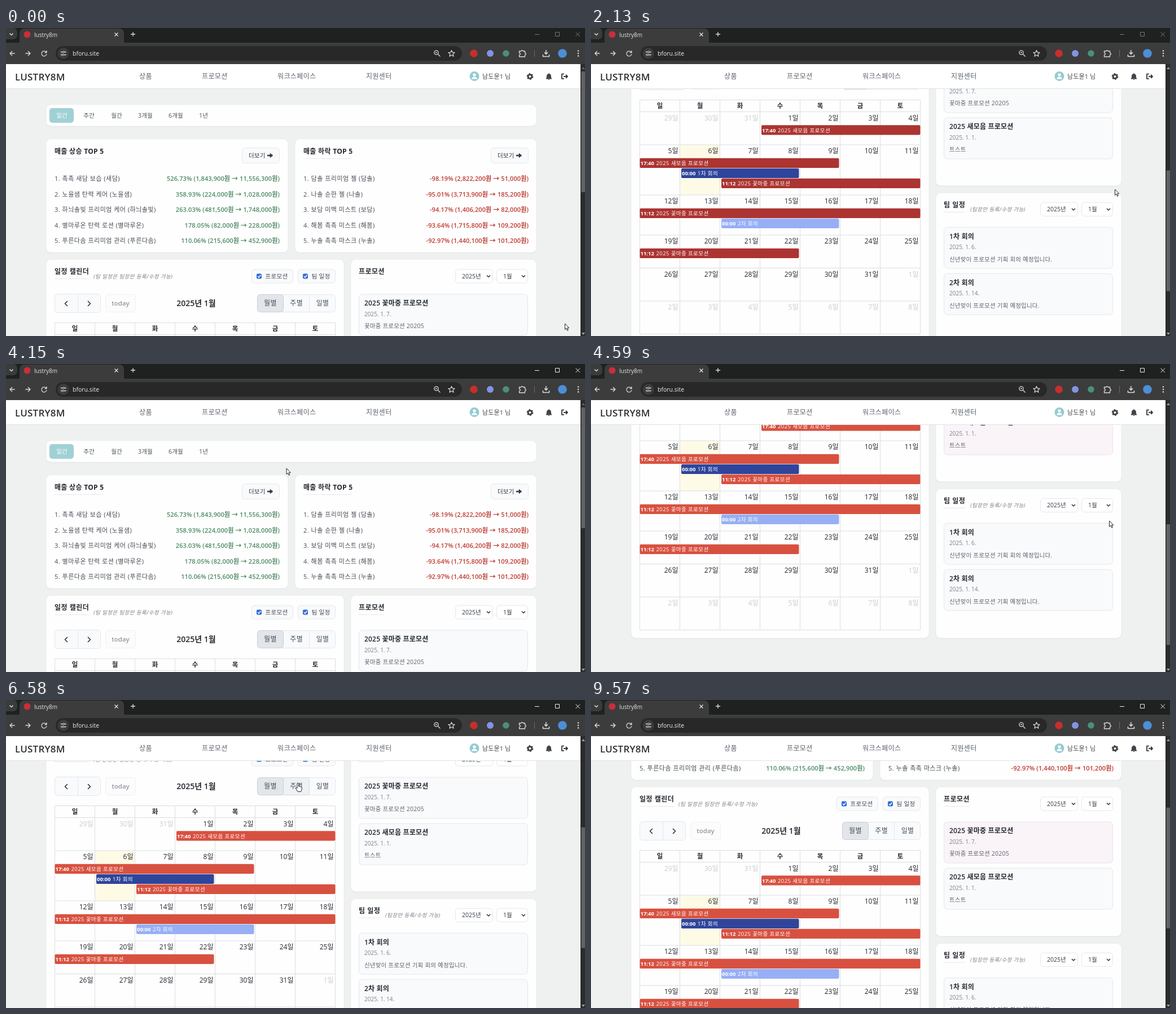
These frames come from a looping animation (1026x546 px, 9.85 s). An HTML page:

```html
<!DOCTYPE html>
<html lang="ko">
<head>
<meta charset="utf-8">
<title>lustry8m</title>
<style>
html, body { margin: 0; width: 100%; height: 100%; overflow: hidden; background: #eff1f1; }
svg { display: block; width: 1026px; height: 546px; }
text { font-family: "Open Sans", "Noto Sans CJK KR", "Noto Sans CJK JP", sans-serif; white-space: pre; }
.b { font-weight: 700; }
.s { font-weight: 600; }
.m { text-anchor: middle; }
.e { text-anchor: end; }
.i { font-style: italic; }
</style>
</head>
<body>
<svg viewBox="0 0 1026 546">
  <g id="page"></g>
  <g id="chrome"></g>
  <g id="pointer"></g>
</svg>
<script>
const LOOP = 9850, STEP = 1000 / 7;
const INK = '#23272e', GREY = '#5b626b', SOFT = '#7b8189', LINE = '#e4e7eb', PALE = '#f9fafc';

// Drawing helpers: rectangle, circle, path and vertically centred text
const rect = (x, y, w, h, r, fill, stroke = 'none') =>
  `<rect x="${x}" y="${y}" width="${w}" height="${h}" rx="${r}" fill="${fill}" stroke="${stroke}"/>`;
const circle = (x, y, r, fill, more = '') => `<circle cx="${x}" cy="${y}" r="${r}" fill="${fill}" ${more}/>`;
const path = (d, stroke, width = 1.3, fill = 'none') =>
  `<path d="${d}" fill="${fill}" stroke="${stroke}" stroke-width="${width}" stroke-linejoin="round"/>`;
const text = (x, y, str, size, fill, cls = '', gap = 0.2) =>
  `<text x="${x}" y="${y + size * 0.37}" font-size="${size}" fill="${fill}" class="${cls}" letter-spacing="${gap}">${str}</text>`;
const card = (x, y, w, h) =>
  rect(x - 0.5, y, w + 1, h + 1.2, 8.5, '#e5e8e8') + rect(x + 0.3, y + 0.3, w - 0.6, h - 0.6, 8, '#fefefe');
const chevron = (x, y, color = '#333') => path(`M${x - 3} ${y - 1.5}l3 3 3-3`, color, 1.5);
const heading = (x, y, str, width, gap = 0.5) =>
  text(x, y, str, 12, INK, 'b', gap) + path(`M${x} ${y + 12.5}h${width}`, LINE, 1);

// Linear interpolation through rows of [step, ...values]
function track(keys, k) {
  const n = keys.findIndex(row => row[0] > k);
  if (n < 0) return keys[keys.length - 1].slice(1);
  if (n === 0) return keys[0].slice(1);
  const a = keys[n - 1], b = keys[n], u = (k - a[0]) / (b[0] - a[0]);
  return a.slice(1).map((v, i) => v + (b[i + 1] - v) * u);
}

const within = (k, from, to) => k >= from && k < to;
const isAway = k => within(k, 21, 29);

const scrollKeys = [
  [8, 0], [12, 340], [14, 395], [20, 395], [21, 313], [28, 313],
  [29, 0], [30, 130], [31, 300], [32, 466], [38, 466], [43, 335], [47, 335], [51, 256]
];
const pointerKeys = [
  [0, 990, 524], [1, 997, 440], [2, 990, 340], [3, 969, 263], [5, 969, 263], [8, 930, 290], [15, 928, 286],
  [19, 808, 206], [23, 808, 206], [26, 34, 88], [28, 75, 92], [30, 918, 278], [37, 918, 278],
  [43, 540, 160], [46, 517, 147], [48, 517, 147], [51, 478, 184], [59, 478, 184], [61, 550, 184],
  [65, 550, 184], [67, 1030, 300]
];
const scrollAt = k => track(scrollKeys, k)[0];

const rising = [
  ['촉촉 새담 보습 (새담)', '526.73% (1,843,900원 → 11,556,300원)'],
  ['노을샘 탄력 케어 (노을샘)', '358.93% (224,000원 → 1,028,000원)'],
  ['하늬솔빛 프리미엄 케어 (하늬솔빛)', '263.03% (481,500원 → 1,748,000원)'],
  ['별마루온 탄력 로션 (별마루온)', '178.05% (82,000원 → 228,000원)'],
  ['푸른다솜 프리미엄 관리 (푸른다솜)', '110.06% (215,600원 → 452,900원)']
];
const falling = [
  ['담솔 프리미엄 젤 (담솔)', '-98.19% (2,822,200원 → 51,000원)'],
  ['나솔 순한 젤 (나솔)', '-95.01% (3,713,900원 → 185,200원)'],
  ['보담 미백 미스트 (보담)', '-94.17% (1,406,200원 → 82,000원)'],
  ['해봄 촉촉 미스트 (해봄)', '-93.64% (1,715,800원 → 109,200원)'],
  ['누솔 촉촉 마스크 (누솔)', '-92.97% (1,440,100원 → 101,200원)']
];
// first and last are day cells counted from the top left of the calendar
const events = [
  { time: '17:40', name: '2025 새모음 프로모션', first: 3, last: 11, promo: true },
  { time: '00:00', name: '1차 회의', first: 8, last: 10, color: '#2f459b' },
  { time: '11:12', name: '2025 꽃마중 프로모션', first: 9, last: 24, promo: true },
  { time: '00:00', name: '2차 회의', first: 16, last: 18, color: '#96aff5' }
];
const goods = [
  ['클렌징크림 하늬솔빛 주름|개선', 17600, 10, '15,840'],
  ['프리미엄선케어 하늬솔빛|활력', 72100, 20, '57,680'],
  ['립오일 하늬솔빛 탄력', 74900, 30, '52,430'],
  ['오메가3 하늬솔빛 영양', 49700, 40, '29,820'],
  ['하늬솔빛 깨끗한 관리', 40000, 50, '20,000'],
  ['하늬솔빛 깔끔한 솔루션', 57000, 60, '22,800'],
  ['촉촉 새담 보습', 32500, 20, '26,000']
];

function ranking(x, title, rows, color) {
  const right = x + 414;
  return card(x, 197, x < 100 ? 429 : 428, 201) + heading(x + 15, 219, title, 86, 0.3) +
    rect(right - 66.5, 212.5, 66, 27, 5, PALE, LINE) + text(right - 55, 226, '더보기', 10.5, '#333a44') +
    path(`M${right - 22} 226h6`, '#333a44', 2.6) + path(`M${right - 17} 222l5 4-5 4z`, '#333a44', 0.5, '#333a44') +
    rows.map(([name, value], i) => {
      const y = 267 + 27.6 * i;
      return text(x + 15, y, `${i + 1}. ${name}`, 11, '#454b54', '', 0.5) +
        text(right, y, value, 11, color, 'e s', 0.1);
    }).join('');
}

function toggle(x, w, label, on, hover) {
  return rect(x + 0.5, 428, w - 1, 24, 5, hover ? '#fff' : PALE, hover ? '#7c97dd' : LINE) +
    rect(x + 9, 435.5, 9, 9, 2, on ? '#2f6bd8' : '#fff', on ? 'none' : '#777') +
    (on ? path(`M${x + 11} 440l2 2.2 3.5-4.4`, '#fff', 1.4) : '') +
    text(x + 24.5, 440, label, 10.5, '#454b54', '', 0.3);
}

// Stacks the visible events of each week into lanes; busy weeks grow taller
function planWeeks(k) {
  const promoOn = !within(k, 56, 60), teamOn = !within(k, 62, 65);
  const shown = events.filter(e => e.promo ? promoOn : teamOn);
  let bottom = 543.5;
  const weeks = [0, 7, 14, 21, 28, 35].map(start => {
    const ends = [], bars = [], top = bottom;
    for (const e of shown) {
      const from = Math.max(e.first - start, 0), to = Math.min(e.last - start, 6);
      if (from > 6 || to < 0) continue;
      let lane = ends.findIndex(end => end < from);
      if (lane < 0) lane = ends.length;
      ends[lane] = to;
      bars.push({ e, from, to, lane });
    }
    bottom += Math.max(58.5, 35 + 18 * ends.length);
    return { start, top, height: bottom - top, bars };
  });
  return { promoOn, teamOn, weeks, bottom };
}

function calendar(k, { promoOn, teamOn, weeks, bottom }) {
  const red = k < 21 ? '#ac3431' : '#d85140';
  let out = card(71, 410.5, 528, bottom + 14.5 - 410.5) + heading(86, 432, '일정 캘린더', 61) +
    text(155, 440, '(팀 일정은 팀장만 등록/수정 가능)', 9.5, SOFT, 'i', 0.4) +
    toggle(435, 74, '프로모션', promoOn, within(k, 51, 60)) +
    toggle(517, 67, '팀 일정', teamOn, within(k, 61, 66)) +
    rect(86.5, 471.5, 81, 33, 5, PALE, LINE) + path('M127.5 472v32', LINE, 1) +
    path('M109 484l-4.5 4.5 4.5 4.5M145 484l4.5 4.5-4.5 4.5', '#333', 1.6) +
    rect(176.5, 472.5, 53, 31, 5, '#fcfcfd', '#eef0f2') + text(203, 488, 'today', 11.5, '#92979e', 'm s', 0) +
    text(337, 488, '2025년 1월', 14, INK, 'm s', 0) +
    rect(445.5, 472.5, 138, 31, 5, PALE, LINE) +
    (within(k, 45, 49) ? rect(491.5, 472.5, 46, 31, 4, '#eef1f5', '#d5dae1') : path('M537.5 473v31', LINE, 1)) +
    rect(445.5, 472.5, 46, 31, 5, '#e2e6eb', '#c9cfd7') +
    ['월별', '주별', '일별'].map((s, i) => text(468.5 + 46.3 * i, 487.5, s, 12, '#4a5159', 'm', 0.4)).join('');

  let lines = 'M86.5 522.5h497M86.5 543.5h497', strips = '';
  for (const { start, top, height, bars } of weeks) {
    if (start === 7) out += rect(157.5, top, 71, height, 0, '#fdfae6');
    for (let col = 0; col < 7; col++) {
      const n = start + col - 2, other = n < 1 || n > 31;
      const day = n < 1 ? n + 31 : n > 31 ? n - 31 : n;
      out += text(154.5 + col * 71, top + 10.7, day + '일', 12, other ? '#cacccd' : INK, 'e', 0);
    }
    for (const { e, from, to, lane } of bars) {
      const x = 86.5 + from * 71 + (e.first >= start ? 2.5 : 0);
      const end = 86.5 + (to + 1) * 71 - (e.last < start + 7 ? 2 : 0);
      const y = top + 23.7 + 18 * lane;
      strips += rect(x, y, end - x, 17.3, 2, e.promo ? red : e.color) +
        text(x + 1, y + 8.8, e.time, 9.5, '#fff', 'b', 0) + text(x + 29, y + 8.8, e.name, 9.5, '#fff', '', 0.4);
    }
    lines += `M86.5 ${top + height}h497`;
  }
  for (let col = 0; col < 8; col++) lines += `M${86.5 + col * 71} 522.5V${bottom}`;
  [...'일월화수목금토'].forEach((s, i) => out += text(122 + 71 * i, 532.5, s, 11.5, INK, 'm b', 0));
  return out + path(lines, '#dcdee1', 1) + strips;
}

function isOver(k, top) {
  const [x, y] = track(pointerKeys, k), pageY = y + scrollAt(k);
  return !isAway(k) && within(x, 625, 925) && y > 107 && within(pageY, top, top + 74);
}

// The hover tint lingers for one step
function item(k, top, title, date, note) {
  const fill = isOver(k, top) || isOver(k - 1, top) ? '#faf3f8' : PALE;
  return rect(625.5, top + 0.5, 299, 73, 6, fill, LINE) + text(635, top + 16.5, title, 12, INK, 's', 0.2) +
    text(635, top + 36, date, 10, SOFT, '', 0) + text(635, top + 57, note, 10.5, GREY, '', 0.2);
}

const selects = y =>
  rect(796.5, y - 12, 66, 24, 5, '#fff', LINE) + text(808, y, '2025년', 10.5, '#333a44', '', 0) + chevron(855, y) +
  rect(869.5, y - 12, 55, 24, 5, '#fff', LINE) + text(881, y, '1월', 10.5, '#333a44', '', 0) + chevron(917, y);

function home(k, plan) {
  const side = (plan.bottom + 14.5 - 410.5 - 13) / 2;  // the two side cards share the calendar's height
  const team = 410.5 + side + 13;
  return card(71, 136, 869, 38) + rect(77, 142, 43, 26, 5, '#a0d0d6') +
    [[99, '일간'], [147, '주간'], [196, '월간'], [247, '3개월'], [301, '6개월'], [350, '1년']]
      .map(([x, s], i) => text(x, 155, s, 10.5, i ? '#4a5159' : '#fff', 'm')).join('') +
    ranking(71, '매출 상승 TOP 5', rising, '#4b8a64') + ranking(512, '매출 하락 TOP 5', falling, '#bf372d') +
    calendar(k, plan) +
    card(611, 410.5, 329, side) + heading(625, 432, '프로모션', 46) + selects(440) +
    item(k, 471.5, '2025 꽃마중 프로모션', '2025. 1. 7.', '꽃마중 프로모션 20205') +
    item(k, 553.5, '2025 새모음 프로모션', '2025. 1. 1.', '트스트') +
    card(611, team, 329, side) + heading(625, team + 21, '팀 일정', 38) +
    text(672, team + 28.7, '(팀장만 등록/수정 가능)', 9.5, SOFT, 'i', 0.4) + selects(team + 28.7) +
    item(k, team + 60, '1차 회의', '2025. 1. 6.', '신년맞이 프로모션 기획 회의 예정입니다.') +
    item(k, team + 142, '2차 회의', '2025. 1. 14.', '신년맞이 프로모션 기획 예정입니다.');
}

function detail() {
  return rect(54, 60, 903, 457, 0, '#f8faf9') + card(78, 60, 856, 441) + rect(96, 60, 820, 83, 0, '#f8faf9') +
    text(96, 180, '할인 상품 목록', 14, INK, 'b', 0.7) +
    rect(871, 166, 45, 28, 3, '#6bac5f') + text(893.5, 180, '수정', 12, '#fff', 'm') +
    goods.map(([name, price, off, sale], i) => {
      const x = 96 + 165.75 * (i % 5), top = i < 5 ? 206 : 345, lines = name.split('|');
      const y = top + 15 * (lines.length - 1);
      return rect(x + 0.5, top + 0.5, 156, i < 5 ? 130 : 115, 6, '#fff', LINE) +
        lines.map((s, n) => text(x + 14.5, top + 19.7 + 15.5 * n, s, 11, '#333a44', '', 0.7)).join('') +
        path(`M${x + 12} ${y + 33.5}h132`, LINE, 1) +
        text(x + 14.5, y + 51, price + '원', 10, '#9a9fa5', '', 0) + path(`M${x + 14.5} ${y + 52}h37`, '#9a9fa5', 1) +
        text(x + 14.5, y + 72, off + '% 할인', 10, '#cf5a52') +
        text(x + 14.5, y + 94, sale + '원', 11, INK, 's', 0);
    }).join('');
}

function scrollbar(scroll, pageHeight) {
  const ratio = 461 / pageHeight;
  return rect(1018, 64, 8, 482, 0, '#2b2b2c') + rect(1019.5, 77 + scroll * ratio, 6.5, 482 * ratio, 1, '#626264') +
    path('M1020 73h6l-3-4z', 'none', 0, scroll ? '#a0a0a0' : '#606060') +
    path('M1020 540h6l-3 4z', 'none', 0, '#a0a0a0');
}

function chrome(k) {
  const light = '#dcdcdc', dark = '#3f444b', control = k < 21 ? '#777' : '#eee';
  return rect(0, 0, 1026, 30, 0, '#1f2121') + rect(-6, 0, 26, 20, 7, '#3a3b3b') + chevron(9.5, 11, light) +
    rect(24, 1, 185, 34, 8, '#3c3c3c') + rect(0, 26, 1026, 38, 0, '#3c3c3c') +
    circle(37.5, 11.5, 6, '#c5303c') + text(50, 12, 'lustry8m', 10, '#e6e6e6', '', 0) +
    path('M192.5 8.5l6 6m0-6l-6 6M221 11h8m-4-4v8', light) +
    path('M937 11.5h8M973.5 7.5h7v7h-7zM1009.5 7.5l7.5 7.5m0-7.5l-7.5 7.5', control, 1) +
    path('M15.5 45H7m4-4l-4 4 4 4M34.5 45h8.5m-4-4l4 4-4 4', light) +
    path('M71 42.5A4.5 4.5 0 1 0 72 46M72 40v3.5h-3.5', light) +
    rect(88, 32, 720, 26, 13, '#282828') + circle(101.5, 45, 10, '#3c3c3c') +
    path('M97 42.5h3.5M104 42.5h2.5M97 47.5h2M102.5 47.5h4', light) +
    circle(102.3, 42.5, 1.5, 'none', `stroke="${light}"`) + circle(100.7, 47.5, 1.5, 'none', `stroke="${light}"`) +
    text(118, 45, 'bforu.site' + (isAway(k) ? '<tspan fill="#c8c8c8">/promotion/19</tspan>' : ''), 10.5, '#eee', '', 0) +
    circle(762.5, 43.5, 3.7, 'none', `stroke="${light}" stroke-width="1.3"`) + path('M765.5 46.5l4 4M761 43.5h3', light) +
    path('M789.5 39.5l1.6 3.7 4 .4-3 2.6.9 4-3.5-2.1-3.5 2.1.9-4-3-2.6 4-.4z', light, 1.2) +
    circle(829, 45, 6.8, '#c62f2c') + circle(858, 45, 6, '#8195e3') + circle(886, 45, 5.8, '#4a9077') +
    path('M909.5 41h3.5a1.8 1.8 0 0 1 3.5 0h3v3.2a1.8 1.8 0 0 1 0 3.6V51h-10v-3.2a1.8 1.8 0 0 0 0-3.6z', light) +
    path('M936.5 39v12', '#6a6a6a', 1) + path('M957 39v7m-3-3l3 3.5 3-3.5M951.5 47v3.5h11V47', light, 1.5) +
    circle(986, 45, 7.8, '#4b8fd6') + [40.5, 45, 49.5].map(y => circle(1014, y, 1.3, light)).join('') +
    rect(0, 106, 1018, 2, 0, '#e0e3e3') + rect(0, 64, 1018, 43, 0, '#fff') +
    text(16, 86.5, 'LUSTRY8M', 17, '#2c2f33', 's', 0.2) +
    [[236, '상품'], [347, '프로모션'], [481, '워크스페이스'], [638, '지원센터']]
      .map(([x, s]) => text(x, 85.5, s, 12, GREY, '', 0.35)).join('') +
    circle(830, 85.5, 8.5, '#94cbd2') + circle(830, 83, 2.7, '#fff') + path('M825 90.5a5 4 0 0 1 10 0z', 'none', 0, '#fff') +
    text(844, 86, '남도윤1 님', 11, '#444a52', '', 0.1) +
    circle(928.5, 86, 3.4, 'none', `stroke="${dark}" stroke-width="2.8"`) +
    circle(928.5, 86, 5, 'none', `stroke="${dark}" stroke-width="1.8" stroke-dasharray="2.618"`) +
    path('M957 90c1.5-1.5 1.5-3 1.5-5a3.5 3.5 0 0 1 7 0c0 2 0 3.5 1.5 5zM962 80v1.5M961 91.5h2', dark, 1, dark) +
    path('M989 81.5h-4v8.5h4M988 85.8h7m-3-3l3 3-3 3', '#25282d', 1.7);
}

function pointer(k) {
  const [x, y] = track(pointerKeys, k);
  const hand = within(k, 18, 21) || within(k, 25, 29) || within(k, 44, 66);
  const shape = hand
    ? path('M-1 1.5a1.3 1.3 0 0 1 2.6 0V6l4 .8q2 .5 1.8 2.5l-.7 3.5-1 2.7H0L-3.5 10q-.6-1.8 1-1.6L-1 9.5z', '#222', 1, '#fff')
    : path('M.5 0v10.5l2.4-2.2 1.7 4 1.7-.8-1.7-3.8h3.2z', '#222', 1, '#fff');
  return `<g transform="translate(${x} ${y})">${shape}</g>`;
}

const layer = id => document.getElementById(id);
let last = -1;

function draw(now) {
  const k = Math.min(67, Math.floor((now % LOOP + 20) / STEP));
  if (k !== last) {
    last = k;
    const away = isAway(k), scroll = scrollAt(k), plan = planWeeks(k);
    layer('page').innerHTML = away ? detail() : home(k, plan);
    layer('page').setAttribute('transform', `translate(0 ${away ? 0 : -scroll})`);
    layer('chrome').innerHTML = chrome(k) + scrollbar(scroll, away ? 896 : 100.5 + plan.bottom);
    layer('pointer').innerHTML = pointer(k);
  }
  requestAnimationFrame(draw);
}
draw(performance.now());
</script>
</body>
</html>
```
